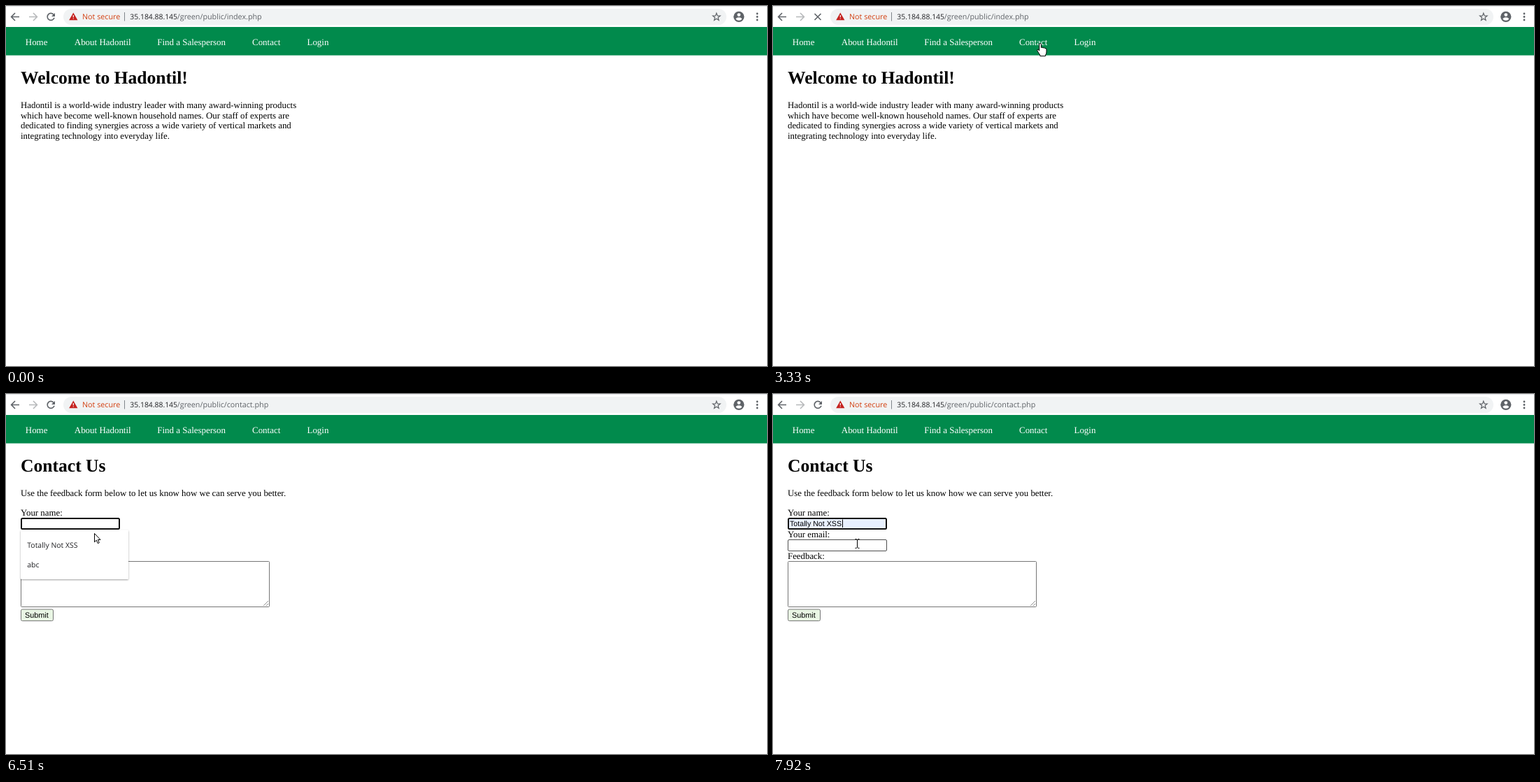
An HTML page for the animation above (8 s loop, 1088 by 515 pixels).

```html
<!DOCTYPE html>
<html lang="en">
<head>
<meta charset="utf-8">
<title>Contact form</title>
<style>
  html, body { margin: 0; width: 100%; height: 100%; overflow: hidden; background: #fff; }
  svg { display: block; width: 1088px; height: 515px; }
  text { white-space: pre; text-rendering: geometricPrecision; }
  .serif { font: 12.85px "Liberation Serif", "Times New Roman", serif; }
  .nav { fill: #fff; font-size: 12.95px; }
  .h1 { font-size: 25.6px; font-weight: bold; }
  .ui { font: 10.75px "Open Sans", "Noto Sans", sans-serif; fill: #202124; }
  .arial { font: 10.67px "Liberation Sans", Arial, sans-serif; }
  .field { fill: #fff; stroke: #767676; }
  .icon { fill: none; stroke: #5f6368; stroke-width: 1.6; }
</style>
</head>
<body>
<svg viewBox="0 0 1088 515">
  <defs>
    <filter id="shadow" x="-10%" y="-10%" width="120%" height="125%">
      <feDropShadow dx="0" dy="1" stdDeviation="1.3" flood-opacity=".38"/>
    </filter>
  </defs>

  <!-- browser bar -->
  <rect width="1088" height="1" fill="#e4e6e9"/>
  <rect x="82" y="4" width="948" height="23" rx="11.5" fill="#f1f3f4"/>
  <path class="icon" d="M19 15.5H8M13 10L7.6 15.5L13 21"/>
  <path class="icon" stroke-opacity=".45" d="M33 15.5H44M39 10L44.4 15.5L39 21"/>
  <g id="reload">
    <path class="icon" d="M68.2 12.4A5 5 0 1 0 69 16.8"/>
    <path fill="#5f6368" d="M70 10V15H65Z"/>
  </g>
  <path id="stop" class="icon" d="M59.5 11L68.5 20M68.5 11L59.5 20"/>
  <path fill="#c5221f" d="M96.3 9.6L102.4 20.2H90.2Z"/>
  <path stroke="#fff" stroke-width="1.2" d="M96.3 13V16.3M96.3 17.4V18.6"/>
  <text class="ui" x="109" y="19.3" style="fill:#d23f10">Not secure</text>
  <path stroke="#80868b" d="M169.5 9V21.5"/>
  <text class="ui" x="177.3" y="19.3" style="font-size:10.4px">35.184.88.145</text>
  <text class="ui" id="path" x="244.8" y="19.3" style="fill:#5f6368"></text>
  <path id="star" class="icon" style="stroke-width:1.2"/>
  <circle cx="1047.8" cy="15.3" r="7.6" fill="#5f6368"/>
  <circle cx="1047.8" cy="12.6" r="2.4" fill="#fff"/>
  <path fill="#fff" d="M1043.2 18.4Q1044.5 16.2 1047.8 16.2T1052.4 18.4Q1050.6 20.8 1047.8 20.8T1043.2 18.4Z"/>
  <g fill="#5f6368">
    <circle cx="1074" cy="11" r="1.4"/><circle cx="1074" cy="15.5" r="1.4"/><circle cx="1074" cy="20" r="1.4"/>
  </g>

  <!-- site header -->
  <rect y="30" width="1088" height="40.6" fill="#018a4c"/>
  <g class="serif">
    <text class="nav" x="27.8" y="55.5">Home</text>
    <text class="nav" x="97.8" y="55.5">About Hadontil</text>
    <text class="nav" x="216.3" y="55.5">Find a Salesperson</text>
    <text class="nav" x="352" y="55.5">Contact</text>
    <text class="nav" x="430.5" y="55.5">Login</text>
  </g>

  <g id="home" class="serif">
    <text class="h1" x="21" y="111">Welcome to Hadontil!</text>
    <text x="21" y="146.4">Hadontil is a world-wide industry leader with many award-winning products</text>
    <text x="21" y="160.9">which have become well-known household names. Our staff of experts are</text>
    <text x="21" y="175.3">dedicated to finding synergies across a wide variety of vertical markets and</text>
    <text x="21" y="189.8">integrating technology into everyday life.</text>
  </g>

  <g id="contact">
    <g class="serif">
      <text class="h1" x="21" y="111">Contact Us</text>
      <text x="21" y="146.4">Use the feedback form below to let us know how we can serve you better.</text>
      <text x="21" y="173.9">Your name:</text>
      <text x="21" y="205.1">Your email:</text>
      <text x="21" y="236.3">Feedback:</text>
    </g>
    <rect id="name" class="field" x="21.5" y="177.5" width="141" height="16" rx="1.5"/>
    <text id="value" x="24" y="188.8"></text>
    <path id="caret" stroke="#000"/>
    <rect id="email" class="field" x="21.5" y="208.5" width="141" height="16" rx="1.5"/>
    <rect class="field" x="21.5" y="239.5" width="355" height="65" rx="1"/>
    <path stroke="#777" stroke-width=".8" d="M368 303L375 296M372 303L375 300"/>
    <rect x="21.5" y="308" width="46" height="16.5" rx="2" fill="#e9f6e4" stroke="#767676"/>
    <text class="arial" x="27" y="320" style="font-size:10.85px">Submit</text>
    <g id="popup">
      <rect x="21" y="194.5" width="154" height="70.5" rx="1.5" fill="#fff" filter="url(#shadow)"/>
      <rect id="row" x="21" width="154" height="28.8" fill="#c8c8c8"/>
      <text class="ui" x="30.3" y="219.5" style="font-size:10.45px">Totally Not XSS</text>
      <text class="ui" x="30.3" y="248.4" style="font-size:10.45px">abc</text>
    </g>
  </g>

  <circle id="click" r="9.8" fill="#f5e414" fill-opacity=".75"/>
  <g id="pointer" stroke="#000" fill="#fff" stroke-linejoin="round">
    <path id="arrow" d="M.5 .5V12.8L3.3 10.2L5.3 14.7L7.3 13.8L5.4 9.5H9Z"/>
    <path id="hand" d="M-1.3 1.3Q0 -.6 1.4 1.3V6.5Q3 5.4 4.2 7Q5.8 6 6.8 7.6Q8.6 7 9 9V13Q9 15.5 7.6 17V18.6H-.2V17Q-2.5 14 -4.2 10.8Q-4.6 8.8 -2.8 9.3L-1.3 11Z"/>
    <path id="beam" fill="none" d="M-1.5 -5Q1 -5 1.5 -4Q2 -5 4.5 -5M1.5 -4V7M-1.5 8Q1 8 1.5 7Q2 8 4.5 8"/>
  </g>
</svg>
<script>
const LOOP = 8000;
const $ = id => document.getElementById(id);
const show = (id, on) => $(id).setAttribute('display', on ? 'inline' : 'none');
const set = (id, attrs) => { for (const k in attrs) $(id).setAttribute(k, attrs[k]); };

// first step, last step, number of steps, x and y reached
const moves = [
  [270, 270, 1, 1010, 495],
  [345, 420, 2, 663, 328],
  [650, 800, 3, 434, 206],
  [970, 1730, 10, 382, 58],
  [2700, 2780, 2, 382, 53],
  [4100, 4650, 8, 135.5, 181.5],
  [6510, 6510, 1, 126, 199],
  [6580, 7050, 7, 110, 236],
  [7130, 7210, 2, 112, 231],
  [7280, 7280, 1, 118, 216],
  [7360, 7360, 1, 118, 213],
  [7830, 7830, 1, 119, 212.5]
];
const clicks = [[1980, 2230], [3160, 3330], [4970, 5200], [7680, 7830]];
const carets = [[4970, 5520], [6050, 6510], [7920, LOOP]];
const rows = ['Totally Not XSS', 'abc'];

const during = (list, t) => list.some(([a, b]) => t >= a && t < b);
const easeOut = p => p * (2 - p);

function pointerAt(t) {
  let x = 1010, y = 495;
  for (const [a, b, n, tx, ty] of moves) {
    if (t < a) break;
    const done = n === 1 ? 1 : Math.min(n, Math.floor((t - a) / (b - a) * (n - 1) + 1e-6) + 1);
    const p = easeOut(done / n);
    x += (tx - x) * p;
    y += (ty - y) * p;
  }
  return [x, y];
}

function draw(t) {
  const [x, y] = pointerAt(t);
  const onForm = t >= 3560, loading = t >= 3330 && t < 3560;
  const focus = t >= 4970, popup = focus && t < 7830, chosen = t >= 7680;
  const inField = top => onForm && x > 21 && x < 163 && y >= top && y < top + 17;
  const overName = inField(177), overEmail = !popup && inField(208);
  const row = popup && y >= 201 ? (y < 230 ? 0 : 1) : -1;
  const value = chosen ? rows[0] : rows[row] || '';

  show('home', !onForm);
  show('contact', onForm);
  show('reload', !loading);
  show('stop', loading);
  $('path').textContent = '/green/public/' + (onForm ? 'contact' : 'index') + '.php';

  set('name', {
    style: focus ? `stroke:#101010;stroke-width:2;fill:${value ? '#e8f0fe' : '#fff'}`
                 : overName ? 'stroke:#4f4f4f' : '',
    x: focus ? 22 : 21.5, y: focus ? 178 : 177.5,
    width: focus ? 140 : 141, height: focus ? 15 : 16
  });
  set('email', { style: overEmail ? 'stroke:#4f4f4f' : '' });
  $('value').textContent = value;
  set('value', { class: chosen ? 'arial' : 'ui' });
  show('caret', during(carets, t));
  set('caret', { d: `M${chosen ? 99.5 : 24.5} 179.5V191` });

  show('popup', popup);
  show('row', row >= 0);
  set('row', { y: row === 1 ? 230 : 201.2 });

  const beam = overName || overEmail;
  const hand = y < 57 && x > 352 && x < 393;
  show('pointer', t >= 270);
  set('pointer', { transform: `translate(${x} ${y})` });
  show('beam', beam);
  show('hand', hand);
  show('arrow', !beam && !hand);
  show('click', during(clicks, t));
  set('click', { cx: x, cy: y });
}

let star = '';
for (let i = 0; i < 10; i++) {
  const r = i % 2 ? 2.4 : 5.6, a = i * Math.PI / 5;
  star += (i ? 'L' : 'M') + (1015.8 + r * Math.sin(a)).toFixed(2) + ' ' + (15.8 - r * Math.cos(a)).toFixed(2);
}
set('star', { d: star + 'Z' });

const start = performance.now();
function tick() {
  draw((performance.now() - start) % LOOP);
  requestAnimationFrame(tick);
}
tick();
</script>
</body>
</html>
```
